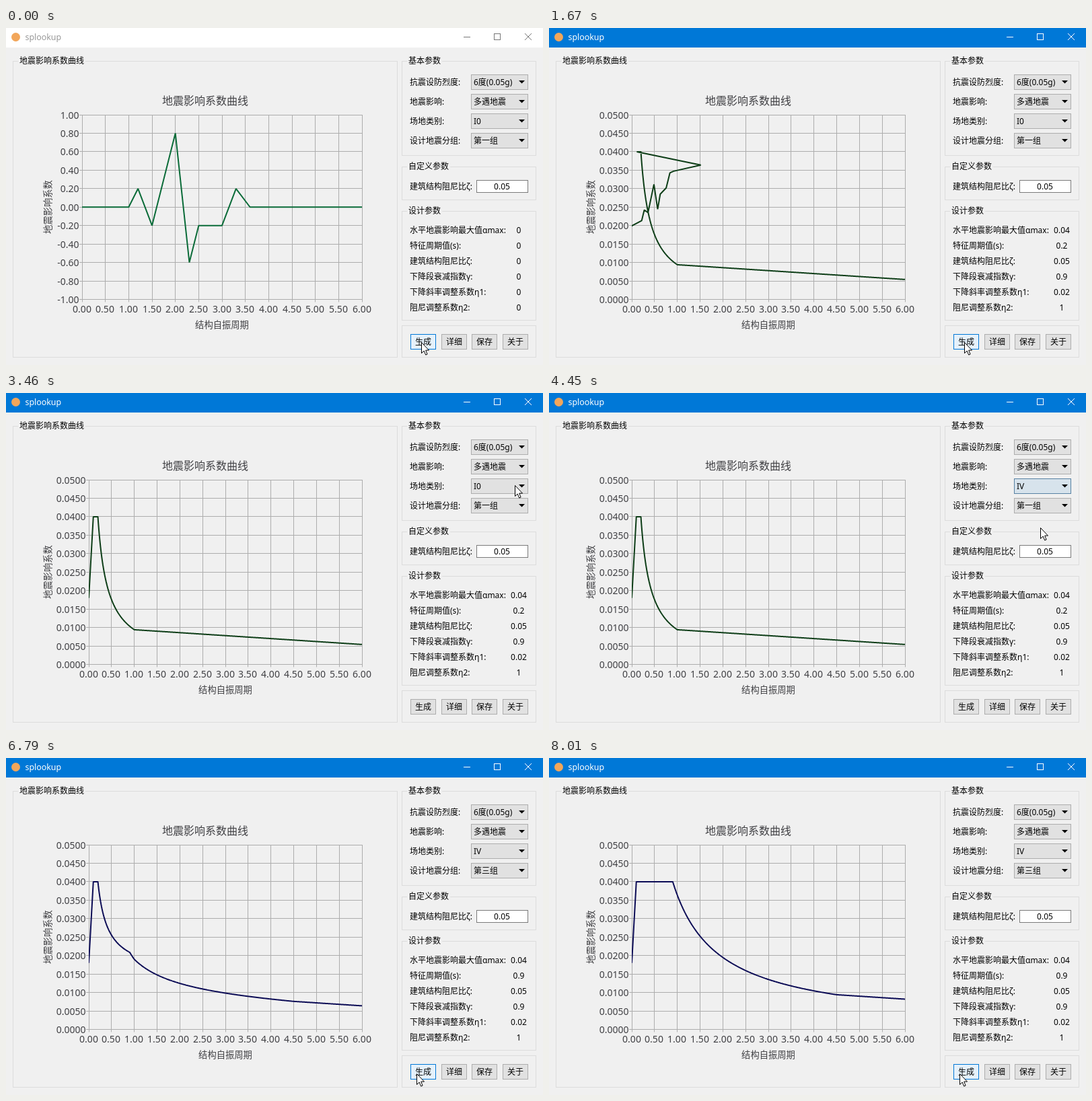
Write an HTML page with a canvas that moves like this. It is 798 by 501 pixels and loops after 8130 ms.

```html
<!DOCTYPE html>
<html lang="zh-CN">
<head>
<meta charset="utf-8">
<title>splookup</title>
<style>
html, body { margin: 0; width: 100%; height: 100%; overflow: hidden; background: #f0f0f0; }
canvas { display: block; }
</style>
</head>
<body>
<canvas id="stage" width="798" height="501"></canvas>
<script>
const ctx = document.getElementById('stage').getContext('2d');
const LOOP = 8130, STEP = 111.37;
const FONT = '"Noto Sans", "Noto Sans CJK SC", "Noto Sans CJK", sans-serif';
const PLOT = { right: 529, top: 129, bottom: 403.5 };

// Control skins: [fill, border]
const PLAIN = [[225, 225, 225], [173, 173, 173]];
const HOVER = [[229, 241, 251], [0, 120, 215]];
const DOWN = [[204, 228, 247], [0, 84, 153]];

// Pointer path: [step, x, y]
const PATH = [
  [0, 617, 467], [20, 617, 467], [23, 613, 459], [26, 613, 459],
  [27, 640, 440], [28, 715, 380], [29, 787, 270], [30, 782, 180],
  [31, 756, 137], [34, 754, 139], [35, 752, 142], [36, 738, 190],
  [37, 727, 225], [39, 727, 225], [40, 730, 200], [42, 762, 175],
  [43, 766, 170], [44, 764, 171], [45, 745, 195], [47, 726, 226],
  [49, 726, 226], [50, 726, 227], [51, 720, 300], [53, 648, 451],
  [54, 648, 451], [55, 614, 466], [56, 610, 469]
];

const START = [[0, 0], [1, 0], [1.2, .2], [1.5, -.2], [2, .8], [2.3, -.6],
  [2.5, -.2], [3, -.2], [3.3, .2], [3.6, 0], [6, 0]];
const SITES = ['I0', 'I1', 'II', 'III', 'IV'];
const GROUPS = ['第一组', '第二组', '第三组'];
const PARAMS = ['水平地震影响最大值αmax:', '特征周期值(s):', '建筑结构阻尼比ζ:',
  '下降段衰减指数γ:', '下降斜率调整系数η1:', '阻尼调整系数η2:'];

const clamp = (v, a = 0, b = 1) => Math.min(b, Math.max(a, v));
const lerp = (a, b, p) => a + (b - a) * p;
const rgb = c => `rgb(${c.map(Math.round)})`;
const mix = (a, b, p) => a.map((c, i) => c.map((v, j) => lerp(v, b[i][j], p)));
const outQuart = t => 1 - (1 - clamp(t)) ** 4;

function text(s, x, y, size = 12, color = '#000', align = 'left') {
  ctx.font = `${size}px ${FONT}`;
  ctx.fillStyle = color;
  ctx.textAlign = align;
  ctx.fillText(s, x, y);
}

function box(x, y, w, h, fill, border) {
  ctx.fillStyle = border;
  ctx.fillRect(x, y, w, h);
  ctx.fillStyle = fill;
  ctx.fillRect(x + 1, y + 1, w - 2, h - 2);
}

function group(x, y, w, h, title) {
  box(x, y, w, h, '#f0f0f0', '#dcdcdc');
  if (!title) return;
  ctx.fillStyle = '#f0f0f0';
  ctx.fillRect(x + 8, y, title.length * 12 + 4, 1);
  text(title, x + 10, y + 4);
}

function strokePath(points, color, width) {
  ctx.beginPath();
  for (const [x, y] of points) ctx.lineTo(x, y);
  ctx.strokeStyle = color;
  ctx.lineWidth = width;
  ctx.lineJoin = 'bevel';
  ctx.stroke();
}

function pointerAt(k) {
  const i = PATH.findIndex(p => p[0] > k);
  if (i < 0) return PATH[PATH.length - 1].slice(1);
  const [a, x0, y0] = PATH[i - 1], [b, x1, y1] = PATH[i];
  const p = (k - a) / (b - a);
  return [Math.round(lerp(x0, x1, p)), Math.round(lerp(y0, y1, p))];
}

function drawTitleBar(active) {
  ctx.fillStyle = active ? '#0078d7' : '#fff';
  ctx.fillRect(0, 0, 798, 29);
  ctx.fillStyle = '#f2a65a';
  ctx.beginPath();
  ctx.arc(14.5, 13.5, 6.5, 0, 7);
  ctx.fill();
  const ink = active ? '#fff' : '#999';
  text('splookup', 28.5, 18, 12.4, ink);
  ctx.strokeStyle = active ? '#fff' : '#777';
  ctx.lineWidth = 1;
  ctx.strokeRect(725.5, 8.5, 9, 9);
  ctx.beginPath();
  ctx.moveTo(680, 13.5); ctx.lineTo(690, 13.5);
  ctx.moveTo(771, 8); ctx.lineTo(781, 18);
  ctx.moveTo(781, 8); ctx.lineTo(771, 18);
  ctx.stroke();
}

// Design response spectrum for characteristic period tg
function spectrum(T, tg) {
  if (T < .1) return .018 + .22 * T;
  if (T <= tg) return .04;
  if (T <= 5 * tg) return .04 * (tg / T) ** .9;
  return .04 * (.2 ** .9 - .02 * (T - 5 * tg));
}

const toPixel = (T, v, left, lo, hi) => [
  lerp(left, PLOT.right, T / 6),
  lerp(PLOT.bottom, PLOT.top, (v - lo) / (hi - lo))
];
const trace = tg => Array.from({ length: 601 },
  (_, i) => toPixel(i / 100, spectrum(i / 100, tg), 123, 0, .05));
const initial = START.map(([T, v]) => toPixel(T, v, 113, -1, 1));
const first = trace(.2), second = trace(.9);

const morph = (from, to, p) => to.map((b, i) => {
  const a = from[i];
  return a ? [lerp(a[0], b[0], p), lerp(a[1], b[1], p)] : b;
});

function drawChart(k, run) {
  const left = run ? 123 : 113, ink = '#404044';
  const { right, top, bottom } = PLOT;
  text('地震影响系数曲线', 296, 114, 16, ink, 'center');
  text('结构自振周期', (left + right) / 2, 446, 13.3, ink, 'center');
  ctx.save();
  ctx.translate(67, 266);
  ctx.rotate(-Math.PI / 2);
  text('地震影响系数', 0, 0, 13.3, ink, 'center');
  ctx.restore();

  ctx.strokeStyle = '#adadad';
  ctx.lineWidth = 1;
  ctx.beginPath();
  for (let i = 0; i <= 12; i++) {
    const x = Math.floor(lerp(left, right, i / 12)) + .5;
    ctx.moveTo(x, top);
    ctx.lineTo(x, bottom + 4);
    text((i / 2).toFixed(2), x - .5, 423, 14, ink, 'center');
  }
  for (let i = 0; i <= 10; i++) {
    const y = Math.floor(lerp(bottom, top, i / 10)) + .5;
    ctx.moveTo(left - 4, y);
    ctx.lineTo(right + 1, y);
    const label = run ? (i * .005).toFixed(4) : ((i - 5) / 5).toFixed(2);
    text(label, left - 4.5, y + 5, 14, ink, 'right');
  }
  ctx.stroke();

  ctx.save();
  ctx.beginPath();
  ctx.rect(left, top, right - left, bottom - top);
  ctx.clip();
  if (!run) strokePath(initial, '#0a6b38', 2);
  else if (run === 1) strokePath(morph(initial, first, outQuart((k - 11.25) / 12.5)), '#0d3d17', 2);
  else strokePath(morph(first, second, outQuart((k - 59.7) / 12.5)), '#0b0b55', 2);
  ctx.restore();
}

function combo(y, value, [fill, border] = PLAIN) {
  box(691, y, 85, 23, rgb(fill), rgb(border));
  text(value, 695, y + 16);
  ctx.fillStyle = '#000';
  ctx.beginPath();
  ctx.moveTo(762, y + 9);
  ctx.lineTo(771, y + 9);
  ctx.lineTo(766.5, y + 13.5);
  ctx.fill();
}

function popup(y, items, pointerY) {
  const row = 18;
  const hot = clamp(Math.floor((pointerY - y - 1) / row), 0, items.length - 1);
  box(691, y, 85, items.length * row + 2, '#fff', '#646464');
  items.forEach((s, i) => {
    const ry = y + 1 + i * row;
    if (i === hot) {
      ctx.fillStyle = '#0078d7';
      ctx.fillRect(692, ry, 83, row);
    }
    text(s, 695, ry + 13, 12, i === hot ? '#fff' : '#000');
  });
}

function button(x, label, [fill, border] = PLAIN) {
  box(x, 455, 38, 23, rgb(fill), rgb(border));
  text(label, x + 19, 471, 12, '#000', 'center');
}

function siteSkin(k) {
  if (k < 35) return mix(PLAIN, HOVER, clamp((k - 31) / 3));
  if (k < 40) return DOWN;
  return mix(DOWN, PLAIN, clamp((k - 38.5) / 3));
}

function groupSkin(k) {
  if (k < 44) return mix(PLAIN, HOVER, clamp((k - 41) / 2));
  if (k < 51) return DOWN;
  return mix(DOWN, PLAIN, clamp((k - 50) / 3));
}

function buttonSkin(k) {
  if ((k >= 1 && k < 11) || k === 59) return DOWN;
  if (k < 27) return HOVER;
  return k < 55 ? mix(HOVER, PLAIN, clamp((k - 26) / 3)) : mix(PLAIN, HOVER, clamp((k - 54) / 3));
}

function drawPanel(k, run) {
  group(588, 49, 200, 141, '基本参数');
  ['抗震设防烈度:', '地震影响:', '场地类别:', '设计地震分组:']
    .forEach((s, i) => text(s, 600, 85 + i * 29));
  combo(69, '6度(0.05g)');
  combo(98, '多遇地震');
  combo(127, SITES[k < 40 ? 0 : 4], siteSkin(k));
  combo(156, GROUPS[k < 50 ? 0 : 2], groupSkin(k));

  group(588, 206, 200, 50, '自定义参数');
  text('建筑结构阻尼比ζ:', 600, 240);
  box(699, 226, 77, 19, '#fff', '#7a7a7a');
  text('0.05', 737, 240, 12, '#000', 'center');

  group(588, 272, 200, 163, '设计参数');
  const values = run ? ['0.04', run === 1 ? '0.2' : '0.9', '0.05', '0.9', '0.02', '1'] : Array(6).fill('0');
  PARAMS.forEach((s, i) => {
    text(s, 600, 305 + i * 23);
    text(values[i], 762, 305 + i * 23, 12, '#000', 'center');
  });

  group(588, 442, 200, 48);
  button(601, '生成', buttonSkin(k));
  button(647, '详细');
  button(692, '保存');
  button(738, '关于');
}

function drawPointer(x, y) {
  ctx.save();
  ctx.translate(x + .5, y + .5);
  ctx.beginPath();
  for (const p of [[0, 0], [0, 16], [3.7, 12.5], [6.2, 18.5], [8.6, 17.5], [6.2, 11.6], [11, 11.6]])
    ctx.lineTo(...p);
  ctx.closePath();
  ctx.fillStyle = '#fff';
  ctx.fill();
  ctx.strokeStyle = '#000';
  ctx.lineWidth = 1;
  ctx.lineJoin = 'miter';
  ctx.stroke();
  ctx.restore();
}

function draw() {
  const t = performance.now() % LOOP;
  // The screen is sampled in fixed steps
  const k = t < 110 ? 0 : Math.min(72, Math.floor(t / STEP + .18));
  const run = k < 12 ? 0 : k < 60 ? 1 : 2;
  const [x, y] = pointerAt(k);

  ctx.fillStyle = '#f0f0f0';
  ctx.fillRect(0, 0, 798, 501);
  drawTitleBar(k > 0);
  group(10, 49, 572, 441, '地震影响系数曲线');
  drawChart(k, run);
  drawPanel(k, run);
  if (k >= 35 && k < 40) popup(150, SITES, y);
  if (k >= 44 && k < 50) popup(179, GROUPS, y);
  drawPointer(x, y);
  requestAnimationFrame(draw);
}

draw();
</script>
</body>
</html>
```
